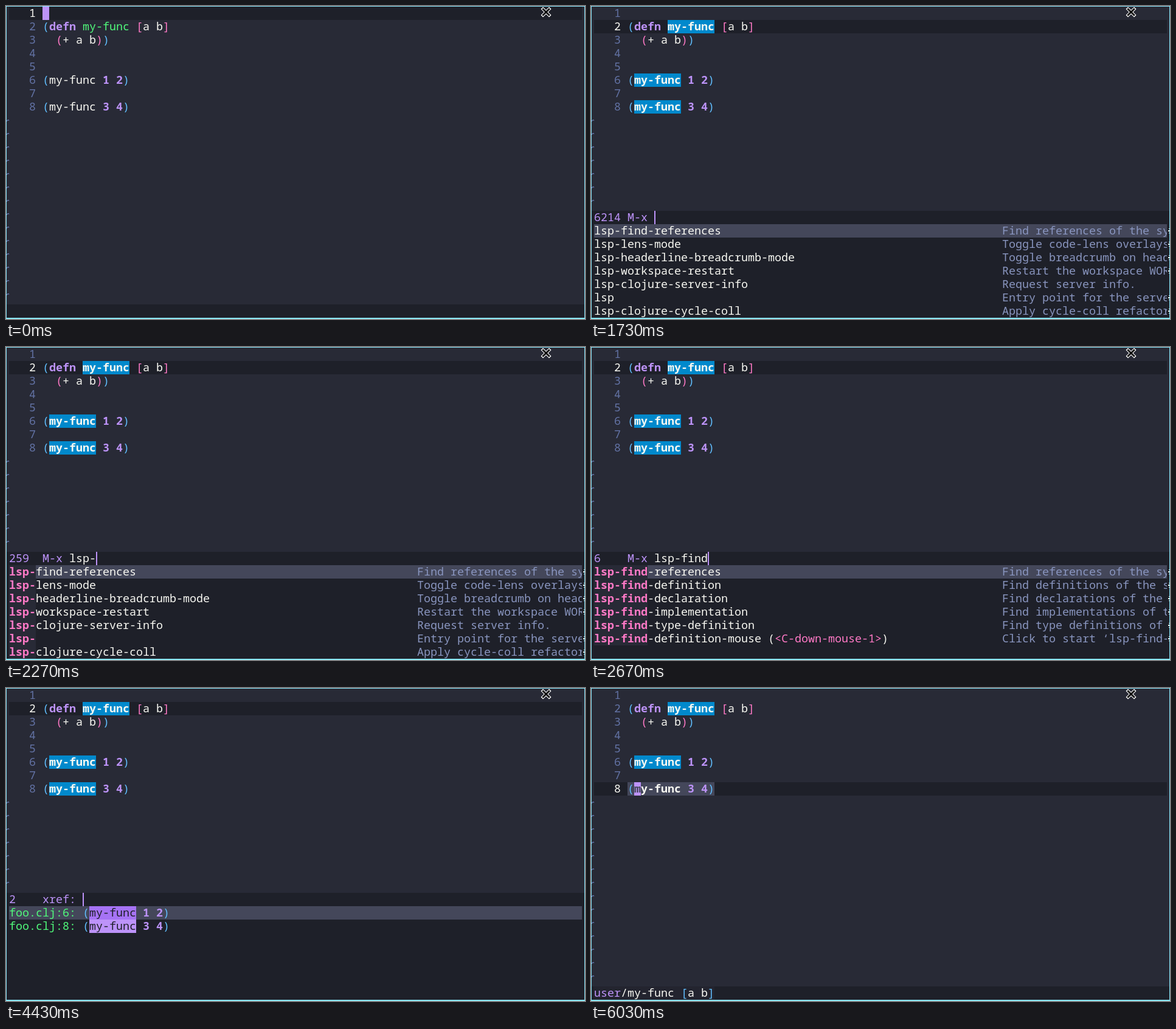
Write an HTML page with a canvas that moves like this. It is 952 by 515 pixels and loops after 6610 ms.

```html
<!DOCTYPE html>
<html lang="en">
<head>
<meta charset="utf-8">
<title>Find references in an editor</title>
<style>
  html, body { margin: 0; width: 100%; height: 100%; overflow: hidden; background: #282a36; }
  canvas { display: block; }
</style>
</head>
<body>
<canvas id="stage" width="952" height="515"></canvas>
<script>
const ctx = document.getElementById('stage').getContext('2d', { alpha: false });
const LOOP = 6610;
const CELL = 11, ROW = 22, LEFT = 5, RIGHT = 947, CODE_X = 60;
const MINI_TOP = 337, ECHO_TOP = 491, NOTE_X = LEFT + 61 * CELL;
const FONT = '18.3333px "Noto Sans Mono", monospace';

const BG = '#282a36', DARK = '#1e2029', SELECT = '#44475a', BORDER = '#8be9fd';
const TEXT = '#f8f8f2', PURPLE = '#bd93f9', MARK = '#0189cc';

// Each style is [colour, bold, background].
const STYLES = {
  text: [TEXT], strong: [TEXT, true], dim: ['#6272a4'], note: ['#8995bf'],
  purple: [PURPLE], keyword: [PURPLE, true], green: ['#50fa7b'],
  blue: ['#61bfff'], pink: ['#ff79c6'],
  mark: [TEXT, true, MARK],
  match: ['#ff79c6', true, BG],
  hit: [DARK, false, PURPLE],
  hitSelected: [DARK, false, '#a673f5'],
};

function rect(x, y, w, h, color) {
  ctx.fillStyle = color;
  ctx.fillRect(x, y, w, h);
}

// Writes alternating style names and strings on the character grid.
function write(x, y, ...parts) {
  for (let i = 0; i < parts.length; i += 2) {
    const [color, bold, bg] = STYLES[parts[i]];
    const text = parts[i + 1];
    if (bg) rect(x, y, text.length * CELL, ROW, bg);
    ctx.fillStyle = color;
    ctx.font = (bold ? 'bold ' : '') + FONT;
    for (const ch of text) {
      if (ch !== ' ') ctx.fillText(ch, x, y + 17);
      x += CELL;
    }
  }
  return x;
}

const rowY = line => 1 + (line - 1) * ROW;

function blockCursor(line, col, ch, ink, bold) {
  const x = CODE_X + col * CELL, y = rowY(line);
  rect(x, y, CELL, ROW, PURPLE);
  ctx.fillStyle = ink;
  ctx.font = (bold ? 'bold ' : '') + FONT;
  ctx.fillText(ch, x, y + 17);
}

function drawEditor(t, miniOpen) {
  const current = t < 400 ? 1 : t < 5600 ? 2 : 8;
  const marked = t >= 930;
  const flash = t >= 3870 && t < 4430 ? 2 : t >= 5600 ? 8 : 0;
  const nameStyle = line =>
    line === flash ? 'strong' : marked ? 'mark' : line === 2 ? 'green' : 'text';
  const call = (line, args) =>
    ['blue', '(', nameStyle(line), 'my-func', 'keyword', args, 'blue', ')'];
  const code = {
    2: ['blue', '(', 'keyword', 'defn', 'text', ' ', nameStyle(2), 'my-func',
        'pink', ' [', 'text', 'a b', 'pink', ']'],
    3: ['pink', '  (', 'text', '+ a b', 'pink', ')', 'blue', ')'],
    6: call(6, ' 1 2'),
    8: call(8, ' 3 4'),
  };

  rect(LEFT, rowY(current), RIGHT - LEFT, ROW, DARK);
  if (flash) rect(CODE_X, rowY(flash), (flash === 2 ? 20 : 13) * CELL, ROW, SELECT);
  for (let line = 1; line <= 8; line++) {
    write(38, rowY(line), line === current ? 'text' : 'dim', String(line));
    if (code[line]) write(CODE_X, rowY(line), ...code[line]);
  }

  if (!miniOpen) {
    if (current === 1) blockCursor(1, 0, ' ', DARK);
    if (current === 2) blockCursor(2, 8, '-', marked ? MARK : DARK, marked);
    if (current === 8) blockCursor(8, 1, 'm', SELECT, true);
  }

  for (let line = 9; line <= (miniOpen ? 15 : 22); line++) {
    const y = rowY(line) + 10;
    rect(2, y, 3, 1, '#6272a4');
    rect(1, y + 1, 2, 1, '#6272a4');
    rect(4, y + 1, 1, 1, '#6272a4');
    rect(1, y + 2, 1, 1, '#6272a4');
  }
}

const COMMANDS = [
  ['lsp-find-references', 'Find references of the symbol'],
  ['lsp-lens-mode', 'Toggle code-lens overlays.'],
  ['lsp-headerline-breadcrumb-mode', 'Toggle breadcrumb on headerline.'],
  ['lsp-workspace-restart', 'Restart the workspace WORKSPACE'],
  ['lsp-clojure-server-info', 'Request server info.'],
  ['lsp', 'Entry point for the server startup.'],
  ['lsp-clojure-cycle-coll', 'Apply cycle-coll refactoring'],
  ['lsp-install-server', 'Interactively install server.'],
];
const FINDERS = [
  COMMANDS[0],
  ['lsp-find-definition', 'Find definitions of the symbol'],
  ['lsp-find-declaration', 'Find declarations of the symbol'],
  ['lsp-find-implementation', 'Find implementations of the symbol'],
  ['lsp-find-type-definition', 'Find type definitions of the symbol'],
  ['lsp-find-definition-mouse', 'Click to start ‘lsp-find-definition’', '<C-down-mouse-1>'],
  ['lsp-format-buffer', 'Ask the server to format this document.'],
];

// [start, typed text, match count, candidates, selected row]
const FIRST = COMMANDS.slice(0, 7), ONLY = FINDERS.slice(0, 1);
const TYPING = [
  [1730, '', 6214, FIRST, 0],
  [1870, 'l', 4873, FIRST, 0],
  [2070, 'lsp', 260, COMMANDS.slice(1), 4],
  [2270, 'lsp-', 259, FIRST, 0],
  [2470, 'lsp-f', 12, FINDERS, 0],
  [2670, 'lsp-find', 6, FINDERS.slice(0, 6), 0],
  [2930, 'lsp-find-r', 1, ONLY, 0],
  [3100, 'lsp-find-re', 1, ONLY, 0],
  [3300, 'lsp-find-ref', 1, ONLY, 0],
  [3470, 'lsp-find-refe', 1, ONLY, 0],
];

function selectRow(y) {
  rect(LEFT, y, RIGHT - LEFT, ROW, SELECT);
}

function truncationArrow(y) {
  rect(950, y + 7, 1, 1, TEXT);
  rect(949, y + 10, 2, 2, TEXT);
  rect(950, y + 14, 1, 1, TEXT);
}

function drawCommands(t) {
  const [, typed, count, list, selected] = TYPING.filter(step => t >= step[0]).pop();
  const end = write(LEFT, MINI_TOP, 'purple', String(count).padEnd(5) + 'M-x ', 'text', typed);
  rect(end, MINI_TOP, 2, ROW, PURPLE);

  list.forEach(([name, note, key], i) => {
    const y = MINI_TOP + (i + 1) * ROW;
    if (i === selected) selectRow(y);
    const x = write(LEFT, y, 'match', typed, 'text', name.slice(typed.length));
    if (key) write(x, y, 'text', ' (', 'pink', key, 'text', ')');
    ctx.save();
    ctx.beginPath();
    ctx.rect(LEFT, y, RIGHT - LEFT, ROW);
    ctx.clip();
    write(NOTE_X, y, 'note', note);
    ctx.restore();
    if (NOTE_X + note.length * CELL > RIGHT) truncationArrow(y);
  });
}

function drawReferences(t) {
  const selected = t < 4800 ? 0 : 1;
  write(LEFT, MINI_TOP, 'purple', '2    xref: ');
  rect(t < 5400 ? 126 : LEFT, MINI_TOP, 2, ROW, PURPLE);
  [[6, ' 1 2'], [8, ' 3 4']].forEach(([line, args], i) => {
    const y = MINI_TOP + (i + 1) * ROW;
    if (i === selected) selectRow(y);
    write(LEFT, y, 'green', `foo.clj:${line}: `, 'blue', '(',
      i === selected ? 'hitSelected' : 'hit', 'my-func', 'keyword', args, 'blue', ')');
  });
}

function drawEcho() {
  rect(LEFT, ECHO_TOP, 18 * CELL, ROW, '#23242f');
  write(LEFT, ECHO_TOP, 'purple', 'user', 'text', '/my-func ',
    'blue', '[', 'text', 'a b', 'blue', ']');
}

function drawPointer() {
  ctx.lineCap = 'square';
  for (const [color, width, reach] of [['#fff', 5, 5], ['#000', 2.8, 4.8]]) {
    ctx.strokeStyle = color;
    ctx.lineWidth = width;
    ctx.beginPath();
    for (const side of [-1, 1]) {
      ctx.moveTo(888 - reach * side, 10 - reach);
      ctx.lineTo(888 + reach * side, 10 + reach);
    }
    ctx.stroke();
  }
}

function draw(t) {
  const miniOpen = t >= 1730 && t < 5600;
  const miniTop = miniOpen ? MINI_TOP : ECHO_TOP;
  rect(0, 0, 952, 515, BORDER);
  rect(1, 1, 950, 512, BG);
  rect(1, miniTop, 950, 513 - miniTop, DARK);
  drawEditor(t, miniOpen);
  if (miniOpen) (t < 3870 ? drawCommands : drawReferences)(t);
  else if (t >= 6030 || (t >= 970 && t < 1730)) drawEcho();
  drawPointer();
}

const start = performance.now();
function tick() {
  draw((performance.now() - start) % LOOP);
  requestAnimationFrame(tick);
}
tick();
</script>
</body>
</html>
```
